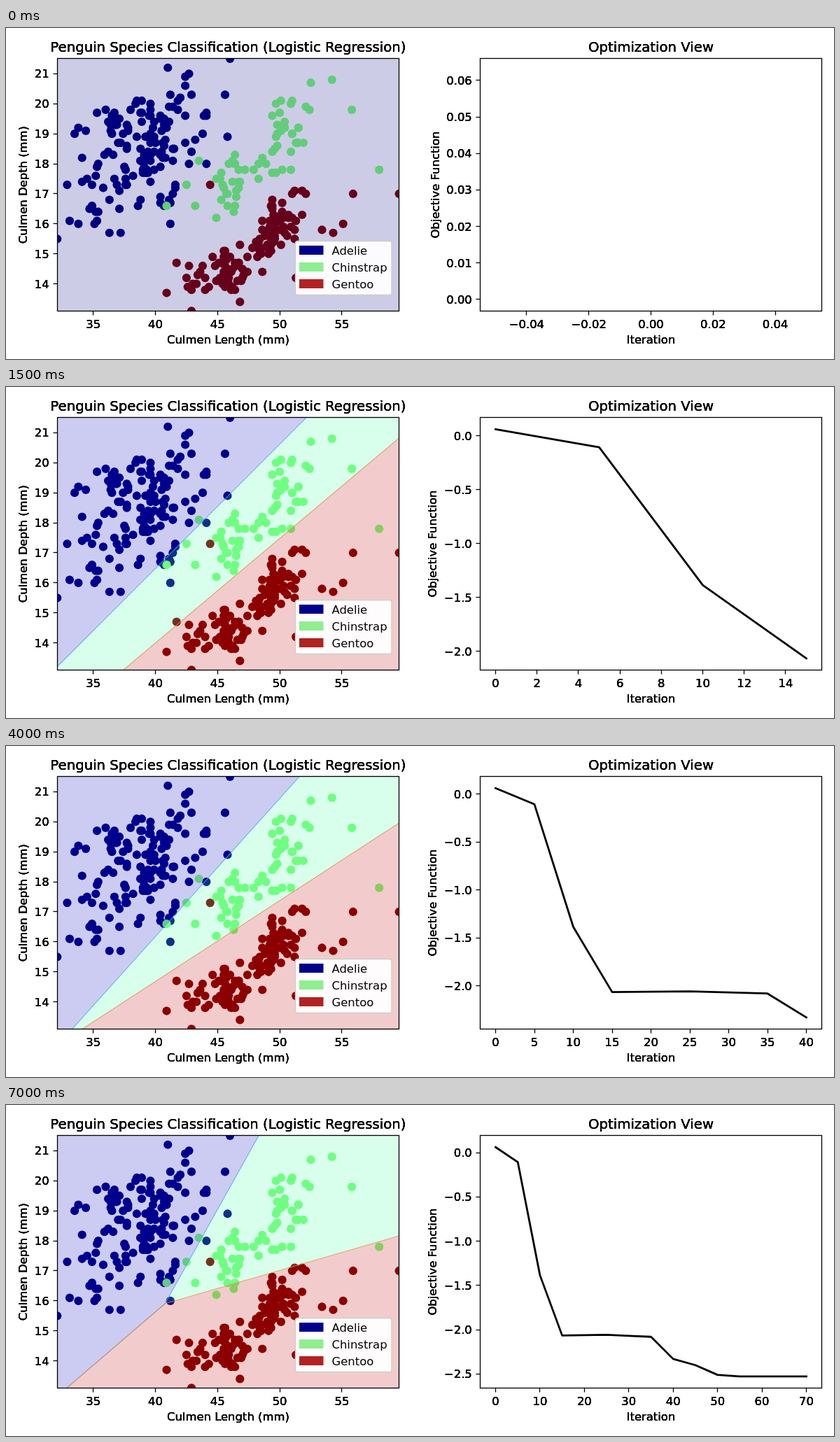
These frames come from a looping animation (1183x473 px, 7500 ms). An HTML page with a canvas:

```html
<!DOCTYPE html>
<html lang="en">
<head>
<meta charset="utf-8">
<title>Penguin Species Classification</title>
<style>
html, body { margin: 0; height: 100%; overflow: hidden; background: #fff; }
canvas { display: block; }
</style>
</head>
<body>
<canvas id="stage" width="1183" height="473"></canvas>
<script>
const ctx = document.getElementById('stage').getContext('2d');
const STEP_MS = 500, STEPS = 15, FONT = 16.43;
const TOP = 43.9, WIDTH = 488.4, HEIGHT = 360.4, BOTTOM = TOP + HEIGHT;

let seed = 23;
const random = () => (seed = seed * 16807 % 2147483647) / 2147483647;
const bell = () => 2 * (random() + random() + random()) - 3;
const round1 = v => Math.round(v * 10) / 10;

// A slanted cloud of points around x, y (in mm).
function cloud(count, x, y, width, slope, spread) {
  return Array.from({ length: count }, () => {
    const dx = width * bell();
    return [round1(x + dx), round1(y + slope * dx + spread * bell())];
  });
}

const species = [
  {
    name: 'Adelie', dot: 'rgb(0,0,128)', key: '#00008b',
    points: [
      [46, 21.5], [45.6, 20.3], [44.1, 19.7], [45.8, 18.9], [44.1, 18], [33.5, 19], [33.1, 16.1], [32.1, 15.5],
      ...cloud(143, 38.8, 18.3, 2.3, 0.18, 1.05)
    ]
  },
  {
    name: 'Chinstrap', dot: 'rgb(124,255,121)', key: '#90ee90',
    points: [
      [58, 17.8], [55.8, 19.8], [54.2, 20.8], [40.9, 16.6], [42.5, 17.3], [43.2, 16.6], [43.5, 18.1],
      ...cloud(28, 46.3, 17.6, 0.9, 0.3, 0.6),
      ...cloud(33, 50.8, 19, 0.95, 0.2, 0.6)
    ]
  },
  {
    name: 'Gentoo', dot: 'rgb(128,0,0)', key: '#b22222',
    points: [
      [59.6, 17], [55.9, 17], [55.1, 16], [54.3, 15.7], [53.4, 15.8], [52.1, 17],
      [51.3, 14.2], [44.4, 17.3], [41.7, 14.7], [40.9, 13.7], [42.9, 13.1],
      ...cloud(54, 45.8, 14.3, 1.5, 0.13, 0.42),
      ...cloud(58, 49.2, 15.6, 1.1, 0.25, 0.45)
    ]
  }
];

// Keys: step, objective value.
const lossKeys = [
  [0, 0.0628], [1, -0.1055], [2, -1.385], [3, -2.065], [5, -2.057], [7, -2.08],
  [8, -2.33], [9, -2.4], [10, -2.51], [11, -2.528]
];
// Keys: step, upper line's x at the top and dx/dy, lower line's y at the right and dx/dy.
const lineKeys = [
  [1, 353.5, 0.923, 45, 1.15], [3, 429, 1, 73, 1.189], [7, 425, 0.972, 80, 1.255],
  [8, 419, 0.9, 110, 1.537], [10, 381, 0.68, 166, 2.646], [11, 361, 0.558, 187, 3.448]
];

function between(keys, n) {
  const i = keys.findIndex(k => k[0] >= n);
  if (i < 0) return keys[keys.length - 1].slice(1);
  const b = keys[i], a = keys[i - 1] || b, t = (n - a[0]) / (b[0] - a[0] || 1);
  return b.slice(1).map((v, j) => a[j + 1] + (v - a[j + 1]) * t);
}

const snap = v => Math.floor(v) + 0.5;

function path(...points) {
  ctx.beginPath();
  points.forEach(([x, y]) => ctx.lineTo(x, y));
}

function setFont(size, align) {
  ctx.font = `${size}px "DejaVu Sans", sans-serif`;
  ctx.textAlign = align;
  ctx.fillStyle = '#000';
}

// Layered text gives the heavier strokes of a plot drawn over itself.
function label(text, x, y, align = 'center', size = FONT, turn = 0) {
  ctx.save();
  ctx.translate(x, y);
  ctx.rotate(turn);
  setFont(size, align);
  for (let i = 0; i < 4; i++) ctx.fillText(text, 0, 0);
  const width = ctx.measureText(text).width;
  ctx.restore();
  return width;
}

function ticks(lo, hi) {
  const raw = (hi - lo) / 9, mag = 10 ** Math.floor(Math.log10(raw));
  const step = +([1, 2, 2.5, 5, 10].find(m => m * mag >= raw) * mag).toPrecision(3);
  const digits = (String(step).split('.')[1] || '').length;
  const out = [];
  for (let i = Math.ceil(lo / step); i * step <= hi; i++)
    out.push([i * step, (i * step).toFixed(digits).replace('-', '\u2212')]);
  return out;
}

function makeAxes(left, x0, x1, y0, y1) {
  return {
    left, x0, x1, y0, y1,
    px: v => left + (v - x0) / (x1 - x0) * WIDTH,
    py: v => TOP + (y1 - v) / (y1 - y0) * HEIGHT
  };
}

function frameAxes(ax, xTicks, yTicks, title, xName, yName) {
  const l = snap(ax.left), mid = ax.left + WIDTH / 2;
  ctx.strokeStyle = '#000';
  ctx.lineWidth = 1.31;
  ctx.strokeRect(l, 43.5, 488, 361);
  for (const [v, text] of xTicks) {
    const x = ax.px(v);
    path([snap(x), 404.5], [snap(x), 410.5]);
    ctx.stroke();
    label(text, x, 428.5);
  }
  let widest = 0;
  for (const [v, text] of yTicks) {
    const y = ax.py(v);
    path([l, snap(y)], [l - 6, snap(y)]);
    ctx.stroke();
    widest = Math.max(widest, label(text, ax.left - 11.5, y + 6, 'right'));
  }
  label(title, mid, 34, 'center', 19.72);
  label(xName, mid, 451);
  label(yName, ax.left - 22 - widest, TOP + HEIGHT / 2, 'center', FONT, -Math.PI / 2);
}

function fillRegion(color, ...points) {
  path(...points);
  ctx.fillStyle = color;
  ctx.fill();
}

function strokeLine(color, ...points) {
  path(...points);
  ctx.strokeStyle = color;
  ctx.lineWidth = 1.2;
  ctx.stroke();
}

function drawRegions(n) {
  const l = 73.2, r = l + WIDTH;
  if (!n) return fillRegion('rgba(0,0,128,.2)', [l, TOP], [r, TOP], [r, BOTTOM], [l, BOTTOM]);
  const [topX, upper, rightY, lower] = between(lineKeys, n);
  const y = (r + lower * rightY - topX - upper * TOP) / (lower - upper);
  const x = topX - upper * (y - TOP);
  const top = [topX, TOP], right = [r, rightY], meet = [x, y], end = [x - 233, y + 200];
  fillRegion('rgba(0,0,195,.2)', [l, TOP], top, meet, end, [l, BOTTOM]);
  fillRegion('rgba(60,250,160,.2)', top, [r, TOP], right, meet);
  fillRegion('rgba(190,0,0,.2)', right, meet, end, [r, BOTTOM]);
  strokeLine('rgba(80,165,235,.75)', top, meet, end);
  strokeLine('rgba(225,145,75,.75)', right, meet, end);
}

function drawLegend() {
  ctx.beginPath();
  ctx.roundRect(413.5, 304.5, 137.5, 77, 3.3);
  ctx.fillStyle = 'rgba(255,255,255,.95)';
  ctx.fill();
  ctx.strokeStyle = '#ccc';
  ctx.lineWidth = 1.3;
  ctx.stroke();
  species.forEach((s, i) => {
    const y = 311 + i * 24;
    setFont(FONT, 'left');
    ctx.fillText(s.name, 465.5, y + 13);
    ctx.fillStyle = s.key;
    ctx.fillRect(419, y, 34.5, 13);
  });
}

const view = makeAxes(73.2, 32.1, 59.6, 13.1, 21.5);
const whole = (lo, hi, step) =>
  Array.from({ length: (hi - lo) / step + 1 }, (_, i) => [lo + i * step, String(lo + i * step)]);

function drawClassifier(n) {
  ctx.save();
  ctx.beginPath();
  ctx.rect(73.2, TOP, WIDTH, HEIGHT);
  ctx.clip();
  for (const s of species) {
    ctx.fillStyle = s.dot;
    for (const [x, y] of s.points) {
      ctx.beginPath();
      ctx.arc(view.px(x), view.py(y), 6.1, 0, 7);
      ctx.fill();
    }
  }
  drawRegions(n);
  ctx.restore();
  frameAxes(view, whole(35, 55, 5), whole(14, 21, 1),
    'Penguin Species Classification (Logistic Regression)', 'Culmen Length (mm)', 'Culmen Depth (mm)');
  drawLegend();
}

function drawObjective(n) {
  const seen = Array.from({ length: n + 1 }, (_, i) => between(lossKeys, i)[0]);
  const hi = seen[0], lo = n ? Math.min(...seen) : 0, pad = (hi - lo) * 0.05;
  const last = n * 5, xPad = n ? last * 0.05 : 0.055;
  const ax = makeAxes(677.3, -xPad, last + xPad, lo - pad, hi + pad);
  if (n) {
    ctx.save();
    path(...seen.map((v, i) => [ax.px(i * 5), ax.py(v)]));
    ctx.strokeStyle = '#000';
    ctx.lineWidth = 2.8;
    ctx.lineJoin = 'round';
    ctx.lineCap = 'square';
    ctx.stroke();
    ctx.restore();
  }
  frameAxes(ax, ticks(ax.x0, ax.x1), ticks(ax.y0, ax.y1),
    'Optimization View', 'Iteration', 'Objective Function');
}

let shown = -1;
function tick() {
  const n = Math.floor(performance.now() / STEP_MS) % STEPS;
  if (n !== shown) {
    shown = n;
    ctx.fillStyle = '#fff';
    ctx.fillRect(0, 0, 1183, 473);
    drawClassifier(n);
    drawObjective(n);
  }
  requestAnimationFrame(tick);
}
tick();
</script>
</body>
</html>
```
